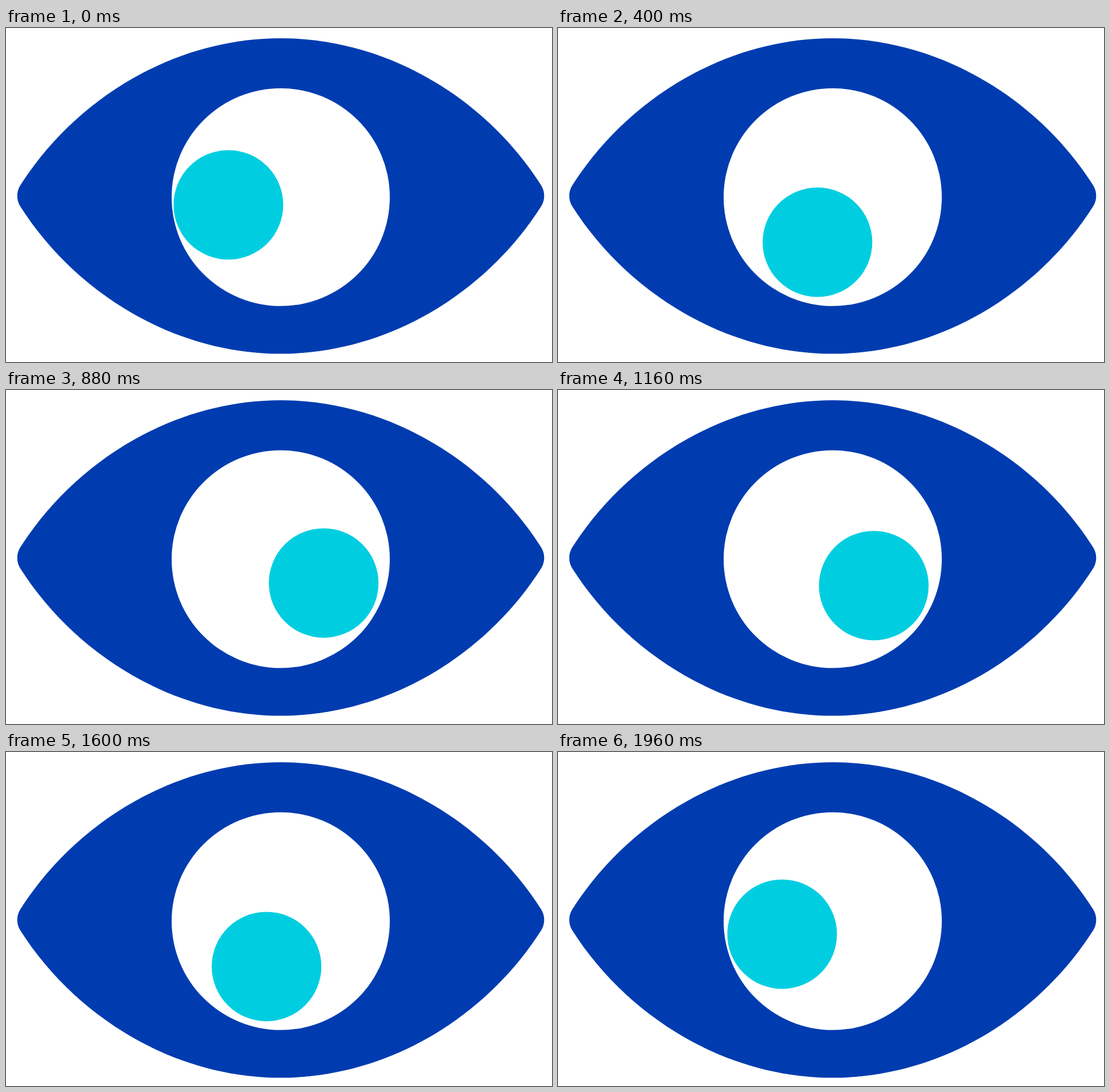
These frames come from a looping animation (956x586 px, 2 s). An HTML page:

```html
<!DOCTYPE html>
<html lang="en">
<head>
<meta charset="utf-8">
<title>Looking eye</title>
<style>
  html, body { margin: 0; width: 100%; height: 100%; overflow: hidden; background: #fff; }
  svg { display: block; }
</style>
</head>
<body>
<svg width="956" height="586" viewBox="0 0 956 586">
  <path fill="#003cb0" d="M25 276C123 122 296 18 481 18S839 122 937 276A35 35 0 0 1 937 313C839 467 666 571.5 481 571.5S123 467 25 313A35 35 0 0 1 25 276Z"/>
  <circle cx="481" cy="296.8" r="191" fill="#fff"/>
  <circle id="pupil" r="96" fill="#00cee0"/>
</svg>
<script>
  const LOOP = 2000, STEP = 40, TURN = 1010;   // ms
  const SWING = 75;                            // degrees either side of straight down
  const path = { x: 479.3, y: 286.2, r: 93.1 };
  const pupil = document.getElementById('pupil');

  function draw() {
    const t = Math.floor((performance.now() + 1) % LOOP / STEP) * STEP;
    // 0 at the left end, 1 at the right end
    const across = t < TURN ? t / TURN : (LOOP - t) / (LOOP - TURN);
    const angle = SWING * (2 * across - 1) * Math.PI / 180;
    pupil.setAttribute('cx', path.x + path.r * Math.sin(angle));
    pupil.setAttribute('cy', path.y + path.r * Math.cos(angle));
    requestAnimationFrame(draw);
  }
  draw();
</script>
</body>
</html>
```
